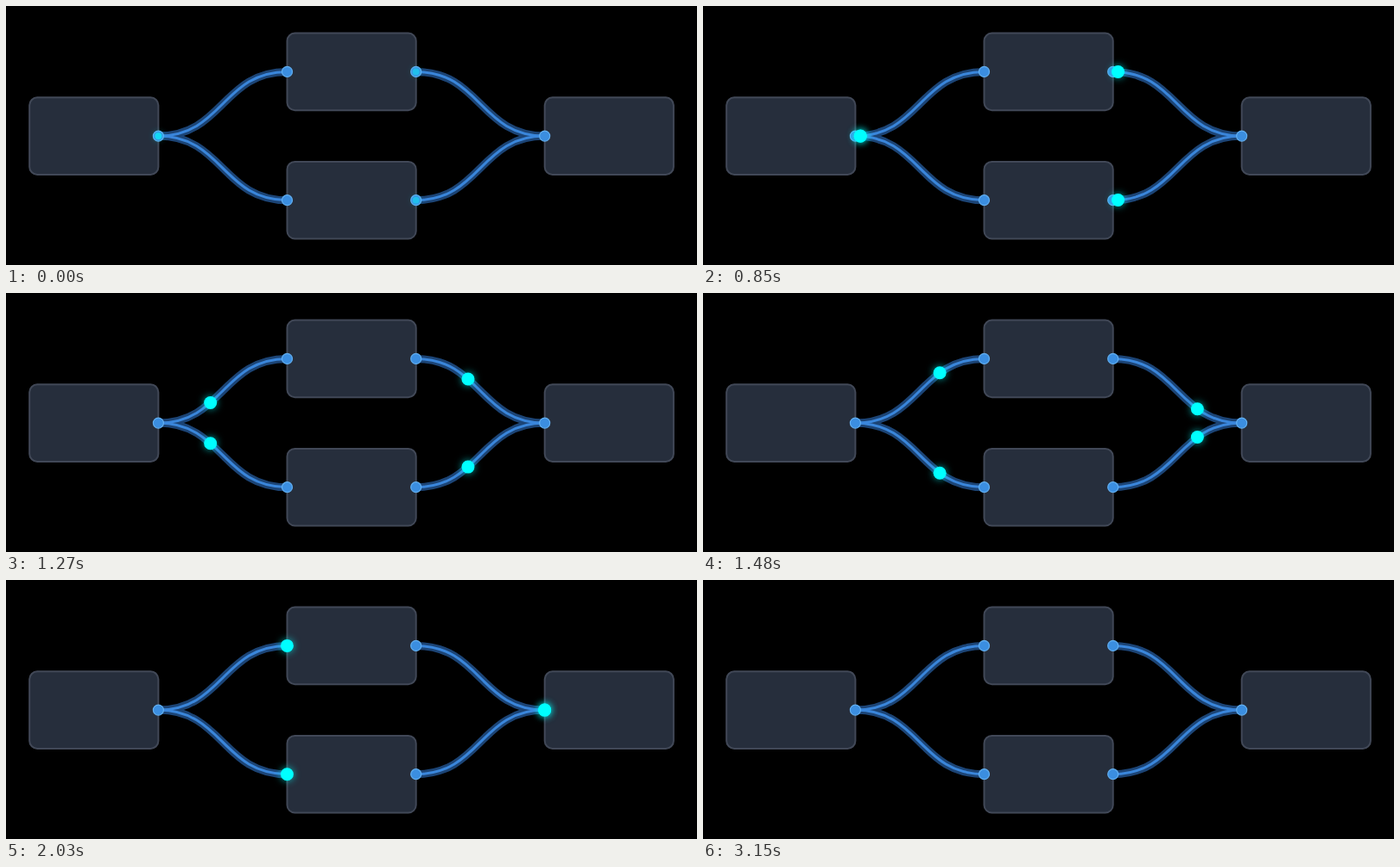
Recreate the animation shown at these times as an HTML page. Size 800 px wide and 301 px high, loop 3300 ms.

```html
<!DOCTYPE html>
<html>
<head>
<meta charset="utf-8">
<style>
  html, body { margin: 0; width: 100%; height: 100%; overflow: hidden; background: #000; }
  svg { display: block; }
  .box { fill: #262e3c; stroke: #414857; stroke-width: 2; }
  .wire { fill: none; stroke: #1c4475; stroke-width: 9; }
  .core { fill: none; stroke: #3a86db; stroke-width: 3; }
  .port { fill: #3b8ee0; stroke: #62aff0; stroke-width: 1.2; }
  .pulse { fill: #0ff; filter: drop-shadow(0 0 4px rgba(0, 255, 255, .65)); }
</style>
</head>
<body>
<svg id="stage" width="800" height="301" viewBox="0 0 800 301"></svg>
<script>
const LOOP = 3300;
const stage = document.getElementById('stage');
const W = 149.2, H = 89.6;
const left = [27.2, 325.5, 623.7];
const [top_, mid, low] = [76.4, 151.1, 225.7];

function add(tag, cls, attrs) {
  const el = document.createElementNS('http://www.w3.org/2000/svg', tag);
  el.setAttribute('class', cls);
  for (const key in attrs) el.setAttribute(key, attrs[key]);
  return stage.appendChild(el);
}

for (const [x, y] of [[left[0], mid], [left[1], top_], [left[1], low], [left[2], mid]])
  add('rect', 'box', { x, y: y - H / 2, width: W, height: H, rx: 9 });

const links = [[0, mid, top_], [0, mid, low], [1, top_, mid], [1, low, mid]].map(([col, y1, y2]) => {
  const x1 = left[col] + W, x2 = left[col + 1], xm = (x1 + x2) / 2;
  return { x1, y1, x2, y2, d: `M${x1} ${y1}C${xm} ${y1} ${xm} ${y2} ${x2} ${y2}` };
});
for (const link of links) add('path', 'wire', { d: link.d });
for (const link of links) link.path = add('path', 'core', { d: link.d });

const ports = new Map();
for (const { x1, y1, x2, y2 } of links)
  for (const [cx, cy] of [[x1, y1], [x2, y2]]) ports.set(cx + ',' + cy, { cx, cy, r: 6 });
for (const port of ports.values()) add('circle', 'port', port);

for (const link of links) {
  link.dot = add('circle', 'pulse', { r: 7.5 });
  link.length = link.path.getTotalLength();
}

const span = (t, from, to) => Math.min(1, Math.max(0, (t - from) / (to - from)));
const easeInOut = (u, p = 2.2) => u < .5 ? (2 * u) ** p / 2 : 1 - (2 - 2 * u) ** p / 2;

function draw(t) {
  const grow = 1 - (1 - span(t, 0, 620)) ** 2;
  const fade = span(t, 2100, 3150) ** 2;
  const travel = easeInOut(span(t, 643, 2057));
  const alpha = (.42 + .58 * grow) * (1 - fade);
  const radius = 7.5 * (.52 + .48 * grow) * (1 - .3 * fade);
  for (const { path, dot, length } of links) {
    const p = path.getPointAtLength(travel * length);
    dot.setAttribute('cx', p.x);
    dot.setAttribute('cy', p.y);
    dot.setAttribute('r', radius);
    dot.setAttribute('opacity', alpha);
  }
}

const start = performance.now();
function tick() {
  draw((performance.now() - start) % LOOP);
  requestAnimationFrame(tick);
}
tick();
</script>
</body>
</html>
```
